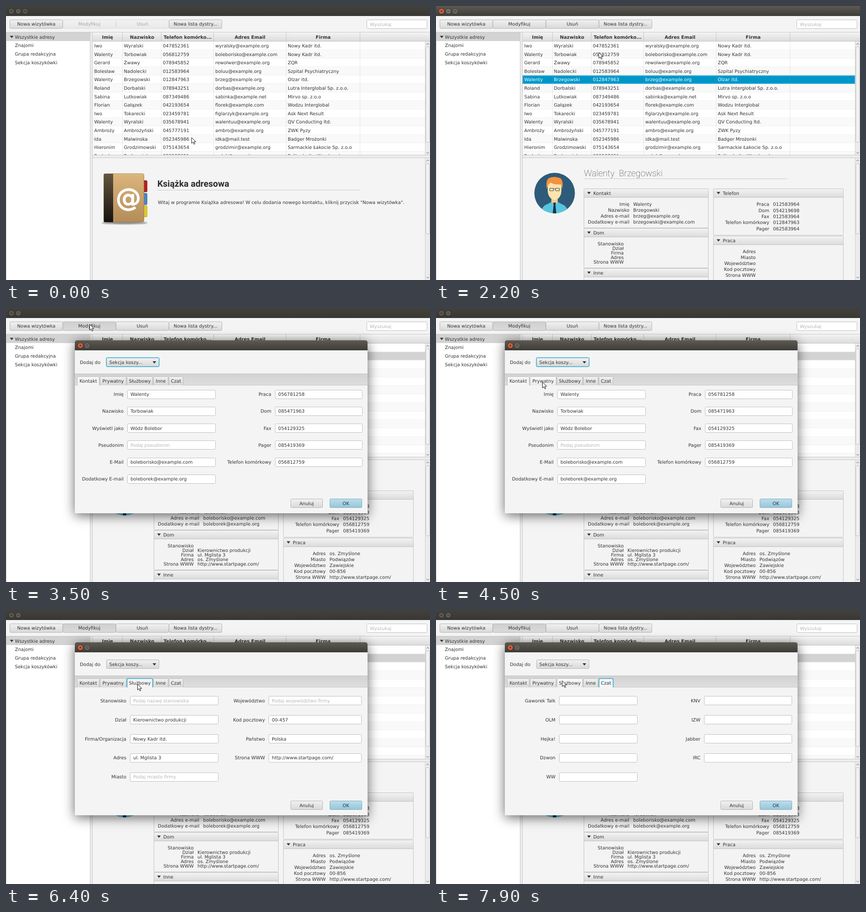
These frames come from a looping animation (930x602 px, 8000 ms). An HTML page:

```html
<!DOCTYPE html>
<html lang="pl">
<meta charset="utf-8">
<title>Książka adresowa</title>
<style>
  html, body { margin: 0; width: 100%; height: 100%; overflow: hidden; background: #f4f4f4; }
  svg { display: block; }
  text { font: 10.11px "DejaVu Sans", sans-serif; fill: #333; white-space: pre; text-rendering: geometricPrecision; }
  .bold { font-weight: bold; }
  .mid { text-anchor: middle; }
  .end { text-anchor: end; }
  .hint { fill: #b3b8b3; }
  .white { fill: #fff; }
  .heading { font: bold 19.4px Roboto, sans-serif; fill: #2b2b2b; }
  .name { font: 100 19.4px Roboto, sans-serif; }
  .at { font-size: 55px; fill: #fff; stroke: #fff; stroke-width: 2; }
  .window { filter: drop-shadow(0 5px 13px rgba(0, 0, 0, .6)); }
</style>
<svg width="930" height="602" viewBox="0 0 930 602">
  <defs id="defs"></defs>
  <g id="scene"></g>
  <path id="cursor" d="M0 0V12.6L3 9.9 5.3 14.8 7.4 13.8 5.2 9.2H9.3Z" fill="#fff" stroke="#111" stroke-linejoin="round"/>
</svg>
<script>
const LOOP = 8000, ROW = 18.62;
const $ = id => document.getElementById(id);

const grads = {
  title: '#5d5a52 #3d3c37', titleOff: '#42413c #383733', button: '#f1f1f1 #d9d9d9', hover: '#fbfbfb #ebebeb',
  pressed: '#cfcfcf #dadada', head: '#f3f3f3 #dbdbdb', ok: '#b8dfee #98c5da', tabs: '#d2d2d2 #dedede',
  spine: '#64563f #17120e', cover: '#dbb57c #b48c59'
};
$('defs').innerHTML = Object.entries(grads).map(([id, pair]) => {
  const [a, b] = pair.split(' ');
  return `<linearGradient id="${id}" x2="0" y2="1"><stop stop-color="${a}"/><stop offset="1" stop-color="${b}"/></linearGradient>`;
}).join('') +
  '<clipPath id="tableClip"><path d="M190 58H919V327H190Z"/></clipPath>' +
  '<clipPath id="face"><circle cx="260.2" cy="411" r="44.5"/></clipPath>' +
  '<filter id="soft"><feGaussianBlur stdDeviation="1.6"/></filter>';

const people = `Iwo|Wyralski|047852361|wyralsky@example.org|Nowy Kadr itd.
Walenty|Torbowiak|056812759|boleborisko@example.com|Nowy Kadr itd.
Gerard|Żwawy|078945852|rewolwer@example.org|ZQR
Bolesław|Nadolecki|012583964|boluu@example.org|Szpital Psychiatryczny
Walenty|Brzegowski|012847963|brzeg@example.org|Olzar itd.
Roland|Dorbalski|078943251|dorbas@example.org|Lutra Interglobal Sp. z.o.o.
Sabina|Lutkowiak|087349486|sabinka@example.net|Mirvo sp. z.o.o
Florian|Gałązek|042193654|florek@example.com|Wodzu Interglobal
Iwo|Tokarecki|023459781|figlarzyk@example.org|Ask Next Result
Walenty|Wyralski|035678941|walentuu@example.org|QV Conducting ltd.
Ambroży|Ambrożyński|045777191|ambro@example.org|ZWK Pyzy
Ida|Malwinska|052345986|idka@mail.test|Badger Mrożonki
Hieronim|Grodzimowski|075143654|grodzimir@example.org|Sarmackie Łakocie Sp. z.o.o
Radosław|Rudnowiak|023587651|radek@example.org|Politechnika Wrocławska`.split('\n').map(line => line.split('|'));

const office = ['', 'Kierownictwo produkcji', 'ul. Mglista 3', 'os. Zmyślone', 'http://www.startpage.com/'];
const home = ['os. Zmyślone', 'Podwiązów', 'Zawiejskie', '00-856', 'http://www.startpage.com/'];
const cards = {
  5: { name: 'Roland Dorbalski', mail: 'dorbek@example.org', phones: ['012583964'] },
  4: { name: 'Walenty  Brzegowski', mail: 'brzegowski@example.com', phones: ['012583964', '054219698', '012583964', '', '062583964'] },
  1: { name: 'Wódz Bolebor', mail: 'boleborek@example.org', phones: ['056781258', '085471963', '054129325', '', '085419369'], office, home }
};

// Form entries: "label=value" or "label?prompt"
const forms = [
  { x: 266, w: 194, x2: 590, w2: 192, y: 189.5, dy: 37.25,
    left: ['Imię=Walenty', 'Nazwisko=Torbowiak', 'Wyświetl jako=Wódz Bolebor', 'Pseudonim?Podaj pseudonim', 'E-Mail=boleborisko@example.com', 'Dodatkowy E-mail=boleborek@example.org'],
    right: ['Praca=056781258', 'Dom=085471963', 'Fax=054129325', 'Pager=085419369', 'Telefon komórkowy=056812759'] },
  { x: 272, w: 194, x2: 576, w2: 205, y: 199, dy: 42,
    left: ['Adres=os. Zmyślone', 'Miasto=Podwiązów', 'Województwo=Zawiejskie'],
    right: ['Kod pocztowy=00-856', 'Państwo=Polska', 'Strona WWW=http://www.startpage.com/'] },
  { x: 272, w: 194, x2: 576, w2: 204, y: 199, dy: 41.9,
    left: ['Stanowisko?Podaj nazwę stanowiska', 'Dział=Kierownictwo produkcji', 'Firma/Organizacja=Nowy Kadr itd.', 'Adres=ul. Mglista 3', 'Miasto?Podaj miasto firmy'],
    right: ['Województwo?Podaj województwo firmy', 'Kod pocztowy=00-457', 'Państwo=Polska', 'Strona WWW=http://www.startpage.com/'] },
  { x: 230, w: 212, x2: 520, w2: 261, y: 199, dy: 42,
    left: ['Własne 1=', 'Własne 2=', 'Własne 3=', 'Własne 4='], right: ['Notatki='], tall: 196 },
  { x: 270, w: 172, x2: 588, w2: 193, y: 199, dy: 41.9,
    left: ['Gaworek Talk=', 'OLM=', 'Hejka!=', 'Dzwon=', 'WW='], right: ['KNV=', 'IZW=', 'Jabber=', 'IRC='] }
];
const tabs = [['Kontakt', 156, 205], ['Prywatny', 206, 264], ['Służbowy', 265, 322], ['Inne', 323, 356], ['Czat', 357, 389]];

// Cursor path: time, x, y
const path = [[0, 407, 289], [100, 407, 289], [500, 379, 178], [900, 379, 178], [1200, 379, 161], [1600, 379, 161],
  [2200, 357, 102], [2500, 343, 93], [3000, 183.5, 36], [3500, 183.5, 36], [4200, 226, 155], [4500, 233.5, 163],
  [5100, 233.5, 163], [5700, 288.5, 163], [6400, 288.5, 163], [6600, 337, 163], [6700, 337, 163], [7000, 372, 163],
  [7200, 372, 163], [7900, 277, 155.5], [LOOP, 277, 155.5]];
const latest = (steps, t) => steps.reduce((value, [at, v]) => t >= at ? v : value, steps[0][1]);
const selection = [[0, -1], [700, 5], [1400, 4], [2400, 1]];
const tabTimes = [[0, 0], [4900, 1], [6000, 2], [6700, 3], [7200, 4]];

const text = (x, mid, s, cls = '') => `<text x="${x}" y="${mid + 3.7}" class="${cls}">${s}</text>`;
const rect = (x, y, w, h, fill) => `<rect x="${x}" y="${y}" width="${w}" height="${h}" fill="${fill}"/>`;
const box = (x, y, w, h, fill, stroke = '#b9b9b9', r = 2) =>
  `<rect x="${x + .5}" y="${y + .5}" width="${w - 1}" height="${h - 1}" rx="${r}" fill="${fill}" stroke="${stroke}"/>`;
const line = (d, color, width = 1) => `<path d="${d}" fill="none" stroke="${color}" stroke-width="${width}"/>`;
const shape = (d, fill) => `<path d="${d}" fill="${fill}"/>`;
const arrow = (x, y) => shape(`M${x} ${y}h8l-4 5z`, '#333');
const button = (x, w, y, label, fill = 'button') =>
  box(x, y, w, 20, `url(#${fill})`, fill === 'ok' ? '#86a9b8' : '#b4b4b4') + text(x + w / 2, y + 9.8, label, 'mid');
const toolButton = (i, label, fill) => button(8 + 116.4 * i, 116.8, 29.8, label, fill);

function lamp(x, y, kind, active) {
  const glyph = { close: 'm-2 -2l4 4m0 -4l-4 4', min: 'm-2.5 0h5', max: 'm-2 -2h4v4h-4z' }[kind];
  const fill = !active ? '#605e58' : kind === 'close' ? '#ee6038' : '#77746b';
  return `<circle cx="${x}" cy="${y}" r="5.8" fill="${fill}" stroke="#2d2c29" stroke-width=".8"/>` + line(`M${x} ${y}${glyph}`, '#33312d', 1.1);
}

function scrollbar(top, bottom, from, to) {
  const x = 919;
  return rect(x, top, 11, bottom - top, '#ebebeb') + line(`M${x + .5} ${top}V${bottom}`, '#cfcfcf') +
    box(x + 1.5, from, 9, to - from, '#f2f2f2', '#bcbcbc') +
    line(`M922 ${top + 7}l3 -3 3 3M922 ${bottom - 7}l3 3 3 -3`, '#666');
}

function table(selected, focused) {
  let out = rect(190, 58, 729, 270, '#fff');
  people.forEach((person, i) => {
    const y = 78 + i * ROW, on = i === selected, lit = on && focused;
    out += rect(190, y, 729, ROW, lit ? '#0096c9' : on ? '#d3d3d3' : i % 2 ? '#f9f9f9' : '#fff');
    out += lit ? line(`M191.2 ${y + 1.2}H917.8V${y + ROW - 1.2}H191.2Z`, '#4dbbe0', .8) : line(`M190 ${y + ROW - .5}H919`, '#efefef');
    person.forEach((s, c) => out += text([193.5, 258.5, 344, 459, 618][c], y + 9.2, s, lit ? 'white' : ''));
  });
  for (const x of [255, 340, 455, 614, 776]) out += line(`M${x + .5} 78V328`, 'rgba(150,150,150,.22)');
  out = `<g clip-path="url(#tableClip)">${out}</g>` + rect(190, 58, 740, 20, 'url(#head)') + line('M190 77.5H930', '#c3c3c3');
  for (const x of [255, 340, 455, 614, 776]) out += line(`M${x + .5} 58V77`, '#c6c6c6');
  ['Imię', 'Nazwisko', 'Telefon komórko...', 'Adres Email', 'Firma'].forEach((s, c) =>
    out += text([222.7, 298.5, 398.5, 535.2, 695.7][c], 68.3, s, 'bold mid'));
  return out + scrollbar(78, 328, 89, 300);
}

function welcome() {
  return '<ellipse cx="260" cy="476.5" rx="50" ry="3" fill="#888" filter="url(#soft)"/>' +
    box(298, 383, 12, 26, '#b3211f', '#98201c') + box(298, 411, 12, 26, '#4c86c2', '#3f72a8') + box(298, 438, 12, 26, '#e2c92c', '#c5ad22') +
    box(214, 368, 89, 107, 'url(#cover)', '#a07c49', 3) + shape('M217 368.5H235V475H217Q214.5 475 214.5 472V371Q214.5 368.5 217 368.5', 'url(#spine)') +
    line('M236 369.8H301', '#e9cfa4') + '<text x="268.5" y="439.5" class="at mid">@</text>' +
    '<text x="332" y="397" class="heading">Książka adresowa</text>' + line('M332 404.5H777', '#c9c9c9') +
    text(333, 431.7, 'Witaj w programie Książka adresowa! W celu dodania nowego kontaktu, kliknij przycisk "Nowa wizytówka".');
}

const avatar = '<g clip-path="url(#face)">' + rect(215, 366, 90, 90, '#2e5b79') +
  shape('M230 458Q231 439 245 435L254 430H266L275 435Q289 439 290 458Z', '#57c5e0') +
  shape('M253 417H267V431L260 437 253 431Z', '#eecb8d') +
  shape('M245 386H275V407Q274 423 260 427 246 423 245 407Z', '#fde3ad') +
  shape('M243 402Q240 382 248 378 260 373 272 378 280 382 277 402L274 392Q260 393 251 388L246 393Z', '#f6923d') +
  shape('M257 432H263L262 437 264 456H256L258 437Z', '#20304a') +
  line('M249.5 400.5h8v5.5h-8zM262.5 400.5h8v5.5h-8zM257.5 402h5', '#38404a') + '</g>';

function panel(x, w, y, bottom, title, labels, values, labelX, first, step) {
  return box(x, y, w, bottom - y, '#f3f3f3', '#c2c2c2', 1) + box(x, y, w, 20, 'url(#head)', '#c2c2c2', 1) +
    arrow(x + 7.5, y + 7.5) + text(x + 21, y + 10, title) +
    labels.map((s, i) => text(labelX, first + i * step, s, 'end') + text(labelX + 8.3, first + i * step, values[i] || '')).join('');
}

function card(i) {
  const c = cards[i], [first, last, mobile, mail] = people[i];
  const phones = c.phones.slice();
  phones[3] = mobile;
  return avatar + `<text x="324.5" y="374" class="name">${c.name}</text>` + line('M325 379.5H770', '#c9c9c9') +
    panel(324, 274, 401, 488, 'Kontakt', ['Imię', 'Nazwisko', 'Adres e-mail', 'Dodatkowy e-mail'], [first, last, mail, c.mail], 424.2, 434.8, 13) +
    panel(324, 274, 488, 576, 'Dom', ['Stanowisko', 'Dział', 'Firma', 'Adres', 'Strona WWW'], c.office || [], 411.7, 521.8, 10.1) +
    panel(324, 274, 576, 620, 'Inne', [], [], 0, 0, 0) +
    panel(608, 286, 401, 504, 'Telefon', ['Praca', 'Dom', 'Fax', 'Telefon komórkowy', 'Pager'], phones, 731, 435.7, 13.3) +
    panel(608, 286, 505, 620, 'Praca', ['Adres', 'Miasto', 'Województwo', 'Kod pocztowy', 'Strona WWW'], c.home || [], 701.3, 538.8, 13.2);
}

function column(entries, x, w, y, dy, height = 20) {
  return entries.map((entry, i) => {
    const [, label, sign, value] = entry.match(/^(.*?)([=?])(.*)$/), mid = y + i * dy;
    return text(x - 8, mid, label, 'end') + box(x, Math.round(mid - 10), w, height, '#fff', '#bfbfbf') +
      text(x + 7, mid, value, sign === '?' ? 'hint' : '');
  }).join('');
}

function dialog(tab, cx, cy) {
  const f = forms[tab], blue = '#2ba6cf';
  let out = '<g class="window">' + shape('M151 451V76Q151 71 156 71H788Q793 71 793 76V451Z', '#f4f4f4') + '</g>' +
    shape('M151 93V76Q151 71 156 71H788Q793 71 793 76V93Z', 'url(#title)') +
    lamp(163, 82.5, 'close', true) + lamp(178, 82.5, 'max', true) + text(162, 119, 'Dodaj do');
  if (!tab) out += box(219, 108, 118, 22, '#8fd0e6', '#8fd0e6', 3);
  out += box(220, 109, 116, 20, 'url(#button)', tab ? '#b4b4b4' : blue) + text(226.5, 119, 'Sekcja koszy...') + arrow(321.5, 117) +
    rect(151, 144, 642, 26, 'url(#tabs)') + line('M151 144.5H793M151 169.5H793', '#c4c4c4');
  tabs.forEach(([label, a, b], i) => {
    const on = i === tab, over = cx >= a && cx < b && cy >= 150 && cy < 170;
    const fill = on ? '#f4f4f4' : over ? 'url(#hover)' : 'url(#button)', edge = on && tab ? blue : '#b9b9b9';
    out += shape(`M${a} 170V152Q${a} 150 ${a + 2} 150H${b - 2}Q${b} 150 ${b} 152V170Z`, fill) +
      line(`M${a}.5 ${on ? 170 : 169}V152.5Q${a}.5 150.5 ${a + 2}.5 150.5H${b - 3}.5Q${b - 1}.5 150.5 ${b - 1}.5 152.5V${on ? 170 : 169}`, edge, on && tab ? 1.5 : 1) +
      text((a + b) / 2, 160, label, 'mid');
  });
  return out + column(f.left, f.x, f.w, f.y, f.dy) + column(f.right, f.x2, f.w2, f.y, f.dy, f.tall) +
    button(624, 71, 419, 'Anuluj') + button(710, 71, 419, 'OK', 'ok');
}

function scene(t, cx, cy) {
  const selected = latest(selection, t), open = t >= 3400, active = t >= 700 && !open;
  const over = cx >= 125 && cx < 241 && cy >= 30 && cy < 50;
  const editFill = t >= 3200 ? 'pressed' : over ? 'hover' : 'button';
  const edit = toolButton(1, 'Modyfikuj', editFill) + toolButton(2, 'Usuń');
  let out = rect(0, 0, 930, 602, '#f4f4f4') + rect(0, 0, 930, 22, `url(#${active ? 'title' : 'titleOff'})`) +
    lamp(12, 11.5, 'close', active) + lamp(27, 11.5, 'min', active) + (open ? '' : lamp(42, 11.5, 'max', active)) +
    toolButton(0, 'Nowa wizytówka') + (selected < 0 ? `<g opacity=".4">${edit}</g>` : edit) +
    toolButton(3, 'Nowa lista dystry...') + box(791, 30, 133, 20, '#fff', '#bfbfbf') + text(798, 39.8, 'Wyszukaj', 'hint') +
    rect(0, 58, 185, 544, '#fff') + rect(0, 58, 185, 19, '#d3d3d3') + arrow(8.5, 65.5);
  ['Wszystkie adresy', 'Znajomi', 'Grupa redakcyjna', 'Sekcja koszykówki'].forEach((s, i) => out += text(19.5, 68 + i * ROW, s));
  out += rect(185, 58, 5, 544, '#ececec') + line('M.5 58V602M184.5 58V602M189.5 58V602M0 57.5H930', '#c8c8c8') +
    table(selected, t < 3200) + rect(190, 328, 740, 6, '#ececec') + line('M190 327.5H930M190 333.5H930', '#c8c8c8') +
    (selected < 0 ? welcome() : card(selected)) + scrollbar(334, 602, 346, 501);
  return open ? out + dialog(latest(tabTimes, t), cx, cy) : out;
}

let shown = -1;
function frame(now) {
  const t = Math.floor(now % LOOP / 100) * 100;
  if (t !== shown) {
    shown = t;
    const i = path.findIndex(p => p[0] > t), [t0, x0, y0] = path[i - 1], [t1, x1, y1] = path[i];
    const k = (t - t0) / (t1 - t0), x = x0 + (x1 - x0) * k, y = y0 + (y1 - y0) * k;
    $('scene').innerHTML = scene(t, x, y);
    $('cursor').setAttribute('transform', `translate(${x} ${y})`);
  }
  requestAnimationFrame(frame);
}
frame(performance.now());
</script>
</html>
```
